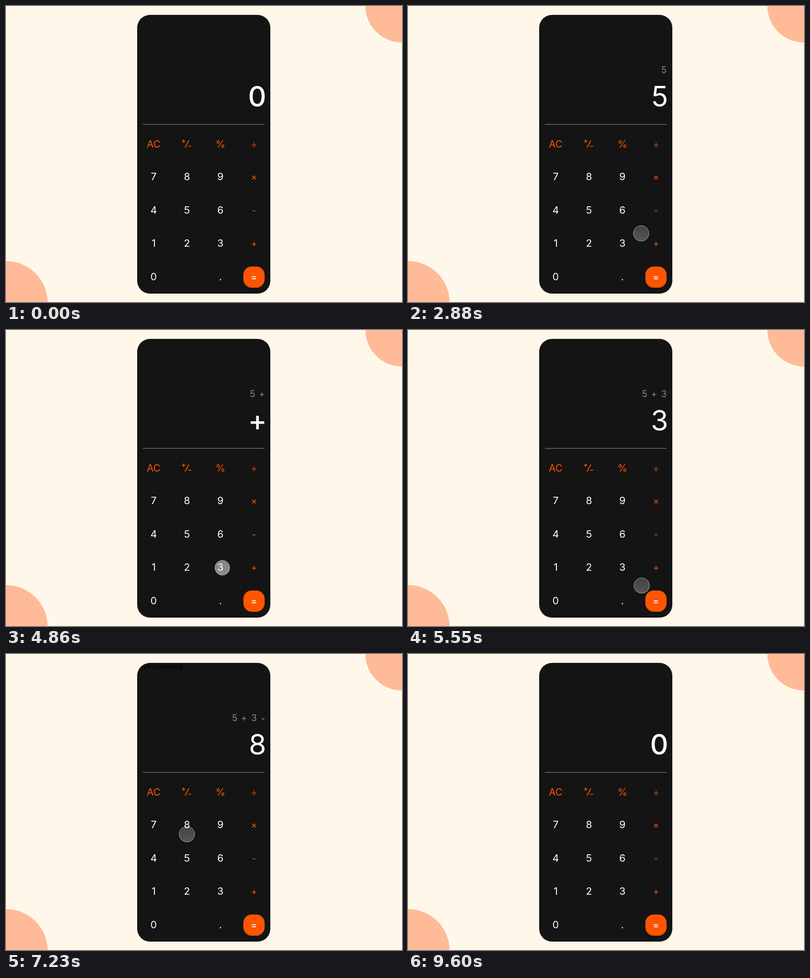
These frames come from a looping animation (800 by 600 pixels, 9630 ms). An HTML page:

```html
<!DOCTYPE html>
<html lang="en">
<head>
<meta charset="utf-8">
<title>Calculator</title>
<style>
  html, body { margin: 0; width: 100%; height: 100%; overflow: hidden; background: #fff8ea; }
  svg { display: block; width: 800px; height: 600px; }
  text { font-family: Inter, Roboto, sans-serif; font-optical-sizing: none; text-anchor: middle; }
  #keys text { font-size: 20.5px; fill: #fff; }
  #keys .op { font-size: 18.5px; fill: #ff5500; }
  #keys .word { font-size: 20px; fill: #ff5500; }
  #keys .equals { font-size: 18.5px; font-weight: 500; }
  #history text { font-size: 18px; fill: #8c8c8c; }
  #display text { font-size: 57px; fill: #fff; }
</style>
</head>
<body>
<svg viewBox="0 0 800 600">
  <defs>
    <clipPath id="panel"><rect x="265" y="18" width="269" height="565" rx="26"/></clipPath>
    <linearGradient id="glass" x1="0" y1="0" x2="0" y2="1">
      <stop offset="0" stop-color="#fff" stop-opacity=".2"/>
      <stop offset="1" stop-color="#fff" stop-opacity=".28"/>
    </linearGradient>
  </defs>
  <rect width="800" height="600" fill="#fff8ea"/>
  <circle cx="800" cy="0" r="74" fill="#ffba98"/>
  <circle cx="0" cy="601" r="84" fill="#ffba98"/>
  <g clip-path="url(#panel)">
    <rect x="265" y="18" width="269" height="565" fill="#141414"/>
    <text id="note" x="265" y="30" font-size="12" style="text-anchor:start">Type Something</text>
    <rect x="276.5" y="239.5" width="246" height="1" fill="#929292"/>
    <rect x="479.5" y="528" width="43" height="43" rx="17" fill="#ff5500"/>
    <g id="keys">
      <path d="M355.2 274h7.2M358.8 270.4v7.2M361.5 287l8-14.5M367.6 284.3h6.6"
            fill="none" stroke="#ff5500" stroke-width="1.6"/>
    </g>
    <g id="history"></g>
    <g id="display"></g>
    <g id="cursor">
      <circle r="15.7" fill="url(#glass)" stroke="#fff" stroke-opacity=".5"/>
      <circle id="glow" r="15.5" fill="#fff"/>
    </g>
  </g>
</svg>
<script>
const LOOP = 9630, FLY = 470, FADE = 150, PRESS = 220;
const $ = id => document.getElementById(id);

function addText(parent, label, x, y, attrs = {}) {
  const el = document.createElementNS('http://www.w3.org/2000/svg', 'text');
  el.textContent = label;
  for (const [name, value] of Object.entries({ x, y, ...attrs })) el.setAttribute(name, value);
  return parent.appendChild(el);
}

const columns = [298.3, 365.5, 433.2, 501];
const rows = [[287, 'AC', '', '%', '÷'], [353.2, '7', '8', '9', '×'], [420.6, '4', '5', '6', '-'],
              [488, '1', '2', '3', '+'], [555.5, '0', '', '.', '=']];
for (const [y, ...labels] of rows) {
  labels.forEach((label, i) => {
    if (!label) return;
    const kind = label === '=' ? 'equals' : i === 3 ? 'op' : y < 300 ? 'word' : 'digit';
    addText($('keys'), label, columns[i], y, { class: kind });
  });
}

// Each value flies from its key (dx, dy away) to the display.
const values = [
  { label: '5', x: 508.7, at: 2040, dx: -143, dy: 229 },
  { label: '+', x: 508, at: 3480, dx: -7, dy: 298, weight: 500 },
  { label: '3', x: 508, at: 4890, dx: -75, dy: 297 },
  { label: '8', x: 508.2, at: 6120, dx: -7, dy: 365 },
  { label: '0', x: 507.3, at: 7965, dx: 0, dy: 0, weight: 500 }
];
for (const v of values) v.el = addText($('display'), v.label, v.x, 203.8, { 'font-weight': v.weight || 400 });
const taps = values.map(v => v.at);

const tokens = ['5', '+', '3', '='].map((label, i) =>
  addText($('history'), label, [0, 19, 39, 57.5][i], 136.3, i === 3 ? { style: 'font-size:12px', y: 134.5 } : {}));
const historyX = [536, 517, 498, 478, 462, 536];

// start, end, from x, from y, to x, to y
const moves = [
  [400, 1665, 249, 240, 364, 402],
  [2260, 3160, 364, 402, 501, 477.5],
  [3750, 4500, 501, 477.5, 437, 482],
  [5200, 5850, 437, 482, 499.5, 546],
  [6705, 7565, 499.5, 546, 300, 277],
  [8350, 9200, 300, 277, 248, 265]
];

const progress = (t, start, length) => Math.min(1, Math.max(0, (t - start) / length));
const easeOut = p => 1 - (1 - p) ** 3;
const easeInOut = p => (1 - Math.cos(Math.PI * p)) / 2;
const mix = (a, b, p) => a + (b - a) * p;

function drawDisplay(t) {
  values.forEach((v, i) => {
    const initial = i === 4 && t < taps[0] + FADE;
    const p = initial ? 1 : easeOut(progress(t, v.at, FLY));
    const next = initial ? taps[0] : taps[i + 1] ?? LOOP;
    v.el.setAttribute('transform', `translate(${v.dx * (1 - p)} ${v.dy * (1 - p)})`);
    v.el.setAttribute('opacity', p * (1 - progress(t, next, FADE)));
  });
}

function drawHistory(t) {
  const count = taps.filter(at => t >= at).length;
  const p = count ? easeOut(progress(t, taps[count - 1], FLY)) : 1;
  const x = count ? mix(historyX[count - 1], historyX[count], p) : historyX[0];
  const clearing = 1 - progress(t, taps[4], FLY);
  $('history').setAttribute('transform', `translate(${x} 0)`);
  $('history').setAttribute('opacity', clearing);
  tokens.forEach((el, i) => el.setAttribute('visibility', i < count ? 'visible' : 'hidden'));
  $('note').setAttribute('opacity', progress(t, taps[3], FADE) * (1 - progress(t, taps[4], FADE)));
}

function drawCursor(t) {
  const [start, end, x0, y0, x1, y1] = moves.findLast(m => t >= m[0]) || moves[0];
  const p = easeInOut(progress(t, start, end - start));
  const press = Math.max(...taps.map(at => easeInOut(Math.max(0, 1 - Math.abs(t - at + 20) / PRESS))));
  $('cursor').setAttribute('transform',
    `translate(${mix(x0, x1, p)} ${mix(y0, y1, p)}) scale(${1 - 0.04 * press})`);
  $('glow').setAttribute('opacity', 0.33 * press);
}

function frame() {
  const t = performance.now() % LOOP;
  drawDisplay(t);
  drawHistory(t);
  drawCursor(t);
  requestAnimationFrame(frame);
}
frame();
</script>
</body>
</html>
```
